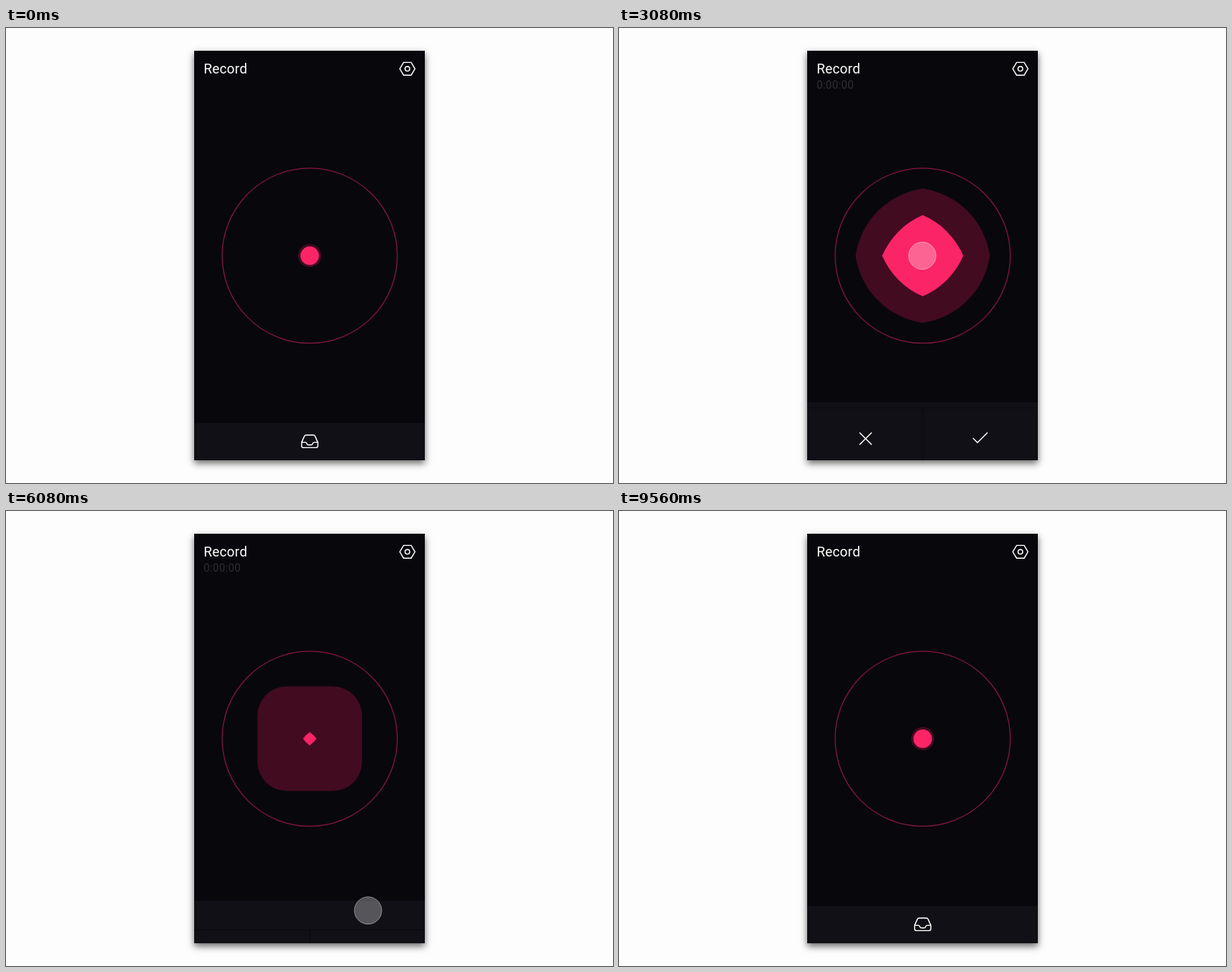
Write an HTML page with a canvas that moves like this. It is 800 by 600 pixels and loops after 9580 ms.

```html
<!DOCTYPE html>
<html lang="en">
<head>
<meta charset="utf-8">
<title>Record</title>
<style>
html, body { margin: 0; width: 100%; height: 100%; overflow: hidden; background: #fdfdfd; }
canvas { display: block; }
</style>
</head>
<body>
<canvas id="stage" width="800" height="600"></canvas>
<script>
const ctx = document.getElementById('stage').getContext('2d');
const LOOP = 9580, OPEN = 2912, CLOSE = 5938;
const SCREEN = { x: 248, y: 30, w: 304, h: 540 };
const PINK = '#fb2467', DARK = '#08070c', BAR = '#111016';

const clamp = v => Math.max(0, Math.min(1, v));
const mix = (a, b, p) => a + (b - a) * p;
const span = (t, start, length) => clamp((t - start) / length);
const inOut = p => p < 0.5 ? 4 * p ** 3 : 1 - (2 - 2 * p) ** 3 / 2;

// cubic-bezier(.25, .1, .25, 1)
function ease(x) {
  let lo = 0, hi = 1;
  for (let i = 0; i < 24; i++) {
    const s = (lo + hi) / 2, q = 1 - s;
    if (0.75 * q * q * s + 0.75 * q * s * s + s ** 3 < x) lo = s; else hi = s;
  }
  const q = 1 - lo;
  return 0.3 * q * q * lo + 3 * q * lo * lo + lo ** 3;
}

// Damped spring from 0 to 1, t in seconds
function spring(t) {
  if (t <= 0) return 0;
  const decay = 7, freq = 6;
  return 1 - Math.exp(-decay * t) * (Math.cos(freq * t) + decay / freq * Math.sin(freq * t));
}

// 0 = idle, 1 = recording
function phase(t, openMs, closeMs) {
  return t < CLOSE ? ease(span(t, OPEN, openMs)) : 1 - ease(span(t, CLOSE, closeMs));
}

function line(points, width = 1.4) {
  ctx.beginPath();
  points.forEach(([x, y]) => ctx.lineTo(x, y));
  ctx.lineWidth = width;
  ctx.stroke();
}

function disc(x, y, r, color) {
  ctx.beginPath();
  ctx.arc(x, y, r, 0, Math.PI * 2);
  ctx.fillStyle = color;
  ctx.fill();
}

// Rounded square; a radius beyond half the side pinches it to a diamond
function blob(half, r, color) {
  const d = r - half, a = d > 0 ? Math.asin(d / r) : 0;
  ctx.beginPath();
  for (let k = 0; k < 4; k++) {
    const turn = k * Math.PI / 2, c = Math.cos(turn), s = Math.sin(turn);
    ctx.arc(400.3 + d * (c - s), 300.3 + d * (s + c), r,
      turn + Math.PI + a, turn + Math.PI * 1.5 - a);
  }
  ctx.closePath();
  ctx.fillStyle = color;
  ctx.fill();
}

function label(text, x, y, size, color, spacing) {
  ctx.font = size + 'px Roboto, "Open Sans", sans-serif';
  ctx.letterSpacing = spacing + 'px';
  ctx.fillStyle = color;
  ctx.fillText(text, x, y);
}

function header(t) {
  label('Record', 260.4, 60.3, 18, '#fff', 0.2);
  const shown = t < CLOSE ? span(t, OPEN, 300) : 1 - span(t, CLOSE, 300);
  ctx.globalAlpha = shown;
  label('0:00:00', 260.4, 80.4, 14, '#505053', 0.45);
  ctx.globalAlpha = 1;

  ctx.strokeStyle = '#fff';
  ctx.beginPath();
  [[519, 53.8], [524, 45.4], [534, 45.4], [539, 53.8], [534, 62.2], [524, 62.2]]
    .forEach(([x, y]) => ctx.lineTo(x, y));
  ctx.closePath();
  ctx.lineWidth = 1.4;
  ctx.stroke();
  ctx.beginPath();
  ctx.arc(529, 53.8, 3.1, 0, Math.PI * 2);
  ctx.stroke();
}

function recorder(t) {
  const radius = phase(t, 300, 300);
  ctx.beginPath();
  ctx.arc(400.3, 300.3, 115.4, 0, Math.PI * 2);
  ctx.strokeStyle = '#80173b';
  ctx.lineWidth = 1.3;
  ctx.stroke();
  blob(mix(15.3, 119.5, phase(t, 400, 500)), mix(15.3, 119.5, radius), '#420b20');
  blob(mix(12.2, 115.7, phase(t, 600, 182)), mix(12.2, 115.7, radius), PINK);
}

function tray(t) {
  ctx.globalAlpha = t < CLOSE ? 1 - span(t, OPEN, 140) : span(t, CLOSE + 142, 280);
  ctx.strokeStyle = '#fff';
  ctx.lineWidth = 1.4;
  ctx.beginPath();
  ctx.moveTo(389.6, 546.4);
  ctx.lineTo(393.2, 538.4);
  ctx.quadraticCurveTo(393.9, 536.7, 395.7, 536.7);
  ctx.lineTo(404.9, 536.7);
  ctx.quadraticCurveTo(406.7, 536.7, 407.4, 538.4);
  ctx.lineTo(411, 546.4);
  ctx.lineTo(411, 551);
  ctx.quadraticCurveTo(411, 553.4, 408.6, 553.4);
  ctx.lineTo(392, 553.4);
  ctx.quadraticCurveTo(389.6, 553.4, 389.6, 551);
  ctx.closePath();
  ctx.stroke();
  ctx.beginPath();
  ctx.moveTo(389.6, 546.4);
  ctx.lineTo(394.4, 546.4);
  ctx.quadraticCurveTo(395.8, 546.4, 396.4, 548);
  ctx.quadraticCurveTo(397, 549.8, 398.5, 549.8);
  ctx.lineTo(402.1, 549.8);
  ctx.quadraticCurveTo(403.6, 549.8, 404.2, 548);
  ctx.quadraticCurveTo(404.8, 546.4, 406.2, 546.4);
  ctx.lineTo(411, 546.4);
  ctx.stroke();
  ctx.globalAlpha = 1;

  const badge = ease(span(t, 6350, 300)) * (1 - ease(span(t, 8050, 320)));
  if (badge > 0) disc(405.2, 536.8, 3.4 * badge, '#fb2f5c');
}

function footer(t) {
  const p = phase(t, 300, 300);
  const top = mix(521, 489, p), panel = mix(570, 489, p);
  ctx.fillStyle = BAR;
  ctx.fillRect(248, top, 304, 570 - top);
  tray(t);
  if (p <= 0) return;

  ctx.fillStyle = BAR;
  ctx.fillRect(248, panel, 304, 81);
  ctx.fillStyle = '#0b0a10';
  ctx.fillRect(248, panel, 304, 1);
  ctx.fillRect(399.5, panel, 1.5, 81);
  ctx.strokeStyle = '#fff';
  const y = panel + 41;
  line([[317, y - 8], [333, y + 8]]);
  line([[333, y - 8], [317, y + 8]]);
  line([[466.5, y - 0.8], [472.4, y + 5.2], [485.7, y - 8]]);
}

function touch(t) {
  if (t < 1800 || t > 7200) return;
  const enter = spring((t - 1800) / 1000);
  const move = inOut(span(t, 3905, 915));
  const leave = inOut(span(t, 6625, 575));
  let x = mix(571, 399.7, enter), y = mix(405, 300.3, enter);
  x = mix(mix(x, 477.2, move), 572, leave);
  y = mix(mix(y, 526.8, move), 432, leave);
  disc(x, y, 18, 'rgba(255,255,255,0.29)');
  ctx.strokeStyle = 'rgba(255,255,255,0.42)';
  ctx.lineWidth = 1;
  ctx.stroke();
}

function draw(t) {
  ctx.fillStyle = '#fdfdfd';
  ctx.fillRect(0, 0, 800, 600);
  ctx.save();
  ctx.shadowColor = 'rgba(0,0,0,0.6)';
  ctx.shadowBlur = 9;
  ctx.shadowOffsetY = 4;
  ctx.fillStyle = DARK;
  ctx.fillRect(SCREEN.x, SCREEN.y, SCREEN.w, SCREEN.h);
  ctx.restore();

  ctx.save();
  ctx.beginPath();
  ctx.rect(SCREEN.x, SCREEN.y, SCREEN.w, SCREEN.h);
  ctx.clip();
  header(t);
  recorder(t);
  footer(t);
  touch(t);
  ctx.restore();
}

const begin = performance.now();
function tick() {
  draw((performance.now() - begin) % LOOP);
  requestAnimationFrame(tick);
}
tick();
</script>
</body>
</html>
```
